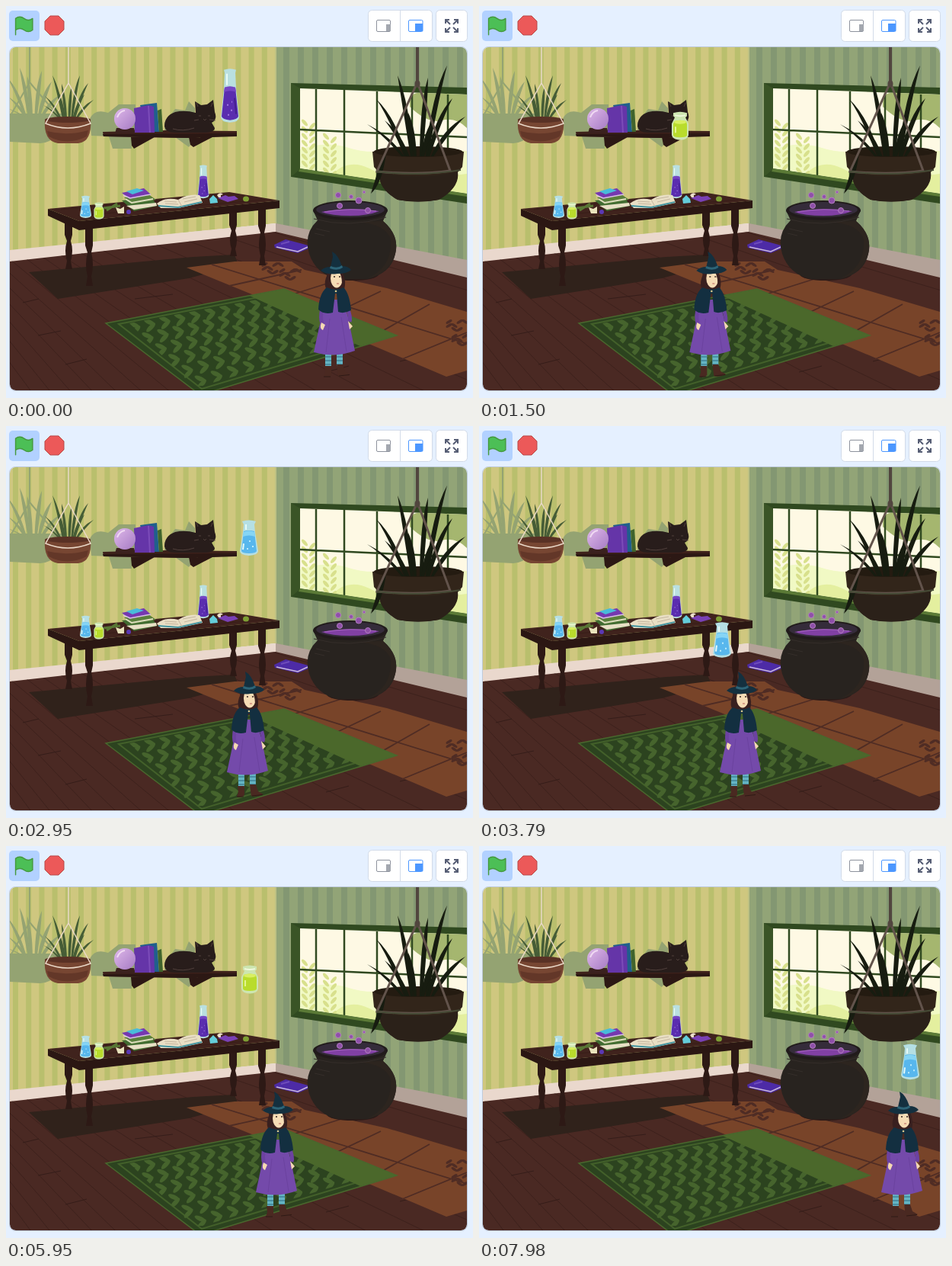
These frames come from a looping animation (613x514 px, 8000 ms). An HTML page:

```html
<!DOCTYPE html>
<html lang="en">
<head>
<meta charset="utf-8">
<title>Potion catcher</title>
<style>
html, body { margin: 0; width: 100%; height: 100%; overflow: hidden; background: #e5f0ff; }
svg { display: block; width: 613px; height: 514px; }
</style>
</head>
<body>
<svg viewBox="0 0 613 514">
<defs>
  <clipPath id="stage"><rect x="5" y="54" width="600" height="450" rx="8"/></clipPath>
  <clipPath id="leftWall"><path d="M5 54H354V285L5 321Z"/></clipPath>
  <clipPath id="rightWall"><path d="M354 54H605V336L354 286Z"/></clipPath>
  <clipPath id="floor"><path d="M5 335L354 296 605 356V504H5Z"/></clipPath>
  <clipPath id="rugInner"><path d="M162 416L362 379 486 430 258 498 245 498Z"/></clipPath>
  <clipPath id="glass"><path d="M386 108L605 116V246L386 213Z"/></clipPath>
  <linearGradient id="orbFill" x2="1" y2="1"><stop stop-color="#dfb9e9"/><stop offset="1" stop-color="#a67bc4"/></linearGradient>

  <g id="purple">
    <path d="M-8-34Q0-37 8-34L7-30 8-10 12 28Q12 34 0 35-12 34-12 28L-8-10-7-30Z" fill="#b9dfe0"/>
    <path d="M-7-11H7L11 27Q10 31 0 32-10 31-11 27Z" fill="#5a2daf"/>
    <path d="M-7-11Q0-14 7-11L8-5Q0-8-8-5Z" fill="#7546c4"/>
    <path d="M-4-29V-14" stroke="#e8fbf6" stroke-width="2"/>
    <path d="M6 3L8 24" stroke="#432190" stroke-width="2"/>
    <path d="M-4 12h2M1 19h2M-3 25h2M2 8h1" stroke="#9c78e0" stroke-width="2"/>
  </g>
  <g id="blue">
    <path d="M-9-22Q0-25 9-22L7-18 8-8 12 17Q12 22 0 23-12 22-12 17L-8-8-7-18Z" fill="#b5dfe4"/>
    <path d="M-7-9Q0-11 7-9L10 17Q9 20 0 20-9 20-10 17Z" fill="#58b7ed"/>
    <path d="M-7-8Q0-11 7-8L8-2Q0-5-8-2Z" fill="#86d5f5"/>
    <path d="M-4-18V-11M-7 7L-8 15" stroke="#e6faf8" stroke-width="2"/>
    <path d="M0 4h2M4 11h2M-3 14h2" stroke="#b9ebfc" stroke-width="2"/>
  </g>
  <g id="green">
    <path d="M-9-17Q0-20 9-17V-13L7-11 11-3V12Q10 18 0 18.500-10 18-11 12V-3L-7-11-9-13Z" fill="#cde5b0"/>
    <path d="M-8-6Q0-9 8-6L9-2V12Q9 15 0 15-9 15-9 12V-2Z" fill="#b9dc2c"/>
    <ellipse cy="-5" rx="8" ry="2.500" fill="#d9ef62"/>
    <path d="M-7-14Q0-12 7-14" stroke="#eff8dc" stroke-width="2" fill="none"/>
    <path d="M-6 1V9" stroke="#e2f58e" stroke-width="2"/>
  </g>

  <g id="witchShape">
    <path d="M-8 350Q-15 362-11 371L13 372Q16 360 11 350Z" fill="#39201f"/>
    <path d="M-12 455H-4V474H-12ZM3 455H11V472H3Z" fill="#65b5c3"/>
    <path d="M-12 460h8M-12 465h8M-12 470h8M3 460h8M3 465h8M3 470h8" stroke="#3f8196" stroke-width="1.500"/>
    <path d="M-13 472H-4V484Q-8 488-14 486L-12 480ZM3 470H11L14 479 21 483Q13 487 5 485Z" fill="#4a2921"/>
    <path d="M-14 486H-5M6 485L20 483.500" stroke="#2f1a16"/>
    <path d="M-12 385H11L18 408 27 452Q0 462-27 454L-18 412Z" fill="#744aaa"/>
    <path d="M-16 396Q-19 410-16 416M17 396Q22 408 20 414" fill="none" stroke="#6c42a1" stroke-width="5"/>
    <path d="M-17 415Q-20 423-15 425L-12 418ZM18 413L24 420 20 424Z" fill="#f5d9b3"/>
    <path d="M-6 410L-11 454M9 408L16 453" stroke="#6b429f"/>
    <path d="M-10 369Q2 374 12 369Q20 377 22 399Q12 404 5 401L3 377H1L-2 402Q-14 405-21 398Q-20 377-10 369Z" fill="#132f40"/>
    <circle cx="2" cy="374" r="1.300" fill="#d6c78c"/>
    <ellipse cx="3" cy="357" rx="8" ry="12.500" fill="#f6dcb5"/>
    <path d="M-5 345Q-7 354-5 365L-9 368-10 350ZM4 347Q10 351 10 364L13 366 11 348Z" fill="#39201f"/>
    <path d="M-1 355h2M6 355h2" stroke="#30201d" stroke-width="1.500"/>
    <path d="M3 364h3" stroke="#b8615c"/>
    <path d="M-18 347Q-13 342-5 342L-2 329-3 322Q5 326 10 341Q18 341 22 346Q17 351 4 351-9 353-18 347Z" fill="#14303f"/>
    <path d="M-5 341Q4 345 10 340L11 343Q4 348-6 344Z" fill="#2d6477"/>
  </g>
</defs>

<g id="toolbar">
  <rect x="4" y="6" width="40" height="40" rx="5" fill="#b2d1ff"/>
  <path transform="translate(11.500 13.500) scale(1.450)" d="M.75 16.750V2A6.440 6.440 0 0 1 8.440 2A6.440 6.440 0 0 0 16.130 2V12.400A6.440 6.440 0 0 1 8.440 12.400A6.440 6.440 0 0 0 .75 12.400" fill="#4cbf56" stroke="#45993d" stroke-linejoin="round" stroke-linecap="round"/>
  <path d="M58 13H69L76 20V31L69 38H58L51 31V20Z" fill="#ec5959" stroke="#b84848"/>
  <g fill="#fff" stroke="#d2dbe9"><rect x="475.500" y="5.500" width="84" height="41" rx="5"/><rect x="564.500" y="5.500" width="41" height="41" rx="5"/></g>
  <path d="M517.500 6V46" stroke="#d2dbe9"/>
  <rect x="486.500" y="18.500" width="18" height="15" rx="1.500" fill="none" stroke="#8d929d"/>
  <path d="M499 24H505V33H499Z" fill="#a3a7af"/>
  <rect x="528.500" y="18.500" width="18.500" height="15" rx="1.500" fill="#fff" stroke="#4c97ff"/>
  <path d="M537 23H547V33H537Z" fill="#4c97ff"/>
  <path d="M577 23V18H582M577 18L583 24M588 18H593V23M593 18L587 24M577 29V34H582M577 34L583 28M588 34H593V29M593 34L587 28" fill="none" stroke="#575e75" stroke-width="2"/>
</g>

<g clip-path="url(#stage)">
  <path d="M5 54H354V285L5 321Z" fill="#cfc77f"/>
  <g id="leftStripes" clip-path="url(#leftWall)"></g>
  <path d="M354 54H605V336L354 286Z" fill="#92a477"/>
  <g id="rightStripes" clip-path="url(#rightWall)"></g>
  <path d="M354 54V286" stroke="#bdc083" stroke-width="2"/>
  <path d="M5 320L354 285V297L5 336Z" fill="#ead8cd"/>
  <path d="M354 285L605 333V357L354 297Z" fill="#b3a298"/>
  <path d="M5 335L354 296 605 356V504H5Z" fill="#4a2923"/>
  <g id="planks" clip-path="url(#floor)" stroke="#351d19"></g>
  <path d="M30 349L245 329 300 326 305 340 240 357 68 384Z" fill="#30221b"/>
  <g id="tiles">
    <path d="M237 343L300 335 375 335 392 346 500 370 605 401V478L578 486 330 381Z" fill="#784429"/>
    <path d="M270 339L605 443M293 367L388 346M345 388L440 358M410 413L492 374M468 441L556 391M520 463L605 428" stroke="#4f2c24" stroke-width="1.800"/>
    <g id="floorLeaves" fill="#4f2c24"></g>
  </g>
  <g id="rug">
    <path d="M131 416L365 371 513 432 255 510Z" fill="#2c431f"/>
    <path d="M148 417L362 376 495 431 257 502Z" fill="none" stroke="#43602a" stroke-width="2"/>
    <g id="rugLeaves" clip-path="url(#rugInner)" fill="#46642d"></g>
    <path d="M320 380L365 371 513 432 465 446Z" fill="#4b682b"/>
    <path d="M131 416L365 371 513 432 255 510Z" fill="none" stroke="#49672d" stroke-width="1.500"/>
  </g>

  <g id="window">
    <path d="M374 101L605 107V259L374 224Z" fill="#304920"/>
    <path d="M386 108L605 116V246L386 213Z" fill="#fef9e4"/>
    <g clip-path="url(#glass)">
      <path d="M386 188Q420 176 450 186T520 186L605 190V246L386 213Z" fill="#f1f9c4"/>
      <path d="M530 118Q545 108 605 110V160Q590 145 572 150T530 132Z" fill="#a5b66f"/>
      <path d="M430 219Q450 200 477 213T510 232L605 220V246H430Z" fill="#e4ef9f"/>
      <g id="gardenLeaves" fill="#d8e08c"></g>
    </g>
    <path d="M407 109V217M444 110V222M487 112V229M533 114V236M580 116V244M386 162L605 172" stroke="#304920" stroke-width="2.500"/>
    <path d="M374 101L386 108V214L374 224Z" fill="#3a5426"/>
    <path d="M386 213L605 246V250L384 217Z" fill="#5b7a36"/>
  </g>

  <g id="wallShadows" fill="#94a372">
    <path d="M5 141H73Q73 178 45 180L5 178ZM110 148Q116 134 134 140L148 129H170V166H208V153L222 135 235 137 240 125 248 134V166H165V187H140L135 171 112 170Z"/>
    <path d="M31 54V100L5 145M31 100L70 146" fill="none" stroke="#94a372" stroke-width="2"/>
    <path d="M222 172H250L240 185Z"/>
    <g id="shadowPlant"></g>
  </g>

  <g id="smallPlant">
    <g id="smallLeaves"></g>
    <path d="M51 149Q81 142 111 149Q113 178 95 180H68Q49 177 51 149Z" fill="#774632"/>
    <ellipse cx="81" cy="149" rx="30" ry="4" fill="#593125"/>
    <path d="M54 164Q80 171 108 163L106 171Q80 184 56 171Z" fill="#633728"/>
    <path d="M82 54V103M82 101L52 154Q81 166 111 154L82 101" fill="none" stroke="#ead8c8" stroke-width="1.500"/>
  </g>

  <g id="shelf">
    <path d="M127 165L210 163 303 164V170L240 173 128 171Z" fill="#3e211b"/>
    <path d="M127 168L303 167V171L240 173 128 171ZM164 172H195L168 187 165 183ZM240 172H271L246 185 242 182Z" fill="#2c1814"/>
    <path d="M145 160H168L170 167H143Z" fill="#3a211e"/>
    <path d="M176 130L198 127 201 165H185Z" fill="#205f8c"/>
    <path d="M199 137L204 135 206 165H201Z" fill="#41642d"/>
    <path d="M168 134L187 130 194 132 195 166H169Z" fill="#6535a8"/>
    <path d="M187 131L189 166" stroke="#7c4cb9" stroke-width="2"/>
    <circle cx="156" cy="148" r="14" fill="url(#orbFill)"/>
    <path d="M146 146Q149 138 156 137" fill="none" stroke="#f0daf3" stroke-width="2"/>
    <path d="M208 158Q208 144 222 139 235 136 249 140L248 125 256 130 264 129 272 123 274 139Q278 149 270 153L274 160Q274 166 258 166H224Q210 167 208 158Z" fill="#281d1b"/>
    <path d="M250 127L252 132M271 127L269 132M253 144h3M265 144h3M259 148l2 2 2-2M247 150l6-1M267 149l8 1M219 161Q232 165 247 160" stroke="#5b4a44" fill="none" stroke-width=".8"/>
  </g>

  <g id="table">
    <g id="legs" fill="#2d1915"></g>
    <path d="M55 266L293 244 359 255 96 282Z" fill="#40231d"/>
    <path d="M55 266L96 282 359 255V265L96 294 55 275Z" fill="#2b1713"/>
    <path d="M72 267L287 247M95 275L340 254" stroke="#381d18"/>
    <use href="#blue" transform="translate(104.500 263.500) scale(.63)"/>
    <use href="#green" transform="translate(122 268.500) scale(.6)"/>
    <use href="#purple" transform="translate(259 230.500) scale(.62)"/>
    <path d="M128 265L150 262M132 268L146 259" stroke="#587634" stroke-width="3"/>
    <path d="M144 264l6 2 5-3v9h-8z" fill="#e9e3bc"/>
    <circle cx="161" cy="270" r="3" fill="#5b38b4"/>
    <path d="M152 255L190 250 199 262 168 269Z" fill="#426c32"/><path d="M158 262L197 258 198 262 168 267Z" fill="#e8e0c5"/>
    <path d="M155 251L187 247 197 254 165 260Z" fill="#5a803c"/><path d="M157 253L165 258 193 253" stroke="#dddcbd" stroke-width="2" fill="none"/>
    <path d="M152 245L181 239 190 247 162 253Z" fill="#7538b0"/><path d="M154 248L163 252 190 247" stroke="#d9c3e3" stroke-width="1.500" fill="none"/>
    <path d="M158 243L172 239 181 242 166 247Z" fill="#49bbd9"/>
    <path d="M198 259Q209 250 226 254 239 246 254 248L258 258 226 265 203 265Z" fill="#e9dfc5"/>
    <path d="M200 262L226 264 257 257" stroke="#4395a0" stroke-width="2" fill="none"/>
    <path d="M226 254L231 263M208 256l16 1M209 259l17 1M232 253l17-3M234 257l17-4" stroke="#c4b59e" fill="none"/>
    <path d="M267 253l5-5 5 5 1 5-10 1z" fill="#64cdda"/>
    <path d="M278 252l10-4 4 2 8-1 5 4-14 4z" fill="#7940b5"/>
    <path d="M277 248q4-5 8-1l-3 1v3h-3z" fill="#eadfca"/>
    <ellipse cx="315" cy="253" rx="4" ry="3.500" fill="#7d9f34"/>
  </g>

  <path d="M352 313L367 306 397 314V318L383 324 353 317Z" fill="#4d2ba6"/>
  <path d="M355 316L383 322 396 316" stroke="#c9b9dd" stroke-width="1.500" fill="none"/>
  <path d="M361 312L372 309" stroke="#6f4cbb" stroke-width="2"/>

  <g id="cauldron">
    <ellipse cx="455" cy="352" rx="34" ry="8" fill="#2b1b18"/>
    <path d="M403 268L409 281Q390 299 398 325 407 352 436 358H475Q506 350 511 325 517 301 495 282L501 268Z" fill="#28231f"/>
    <path d="M458 283Q500 285 505 307 507 342 475 357 503 351 511 325 517 301 495 282Z" fill="#2d251f"/>
    <ellipse cx="452" cy="268" rx="49" ry="13" fill="#211b1b"/>
    <ellipse cx="452" cy="267" rx="45" ry="10" fill="#352c3a"/>
    <path d="M414 270Q452 263 490 269 475 275 452 275 427 275 414 270Z" fill="#8140a4"/>
    <path d="M418 270Q452 264 486 269" stroke="#a765c2" fill="none"/>
    <path d="M404 279Q450 292 499 277M407 292l18 4M405 298l13 3" stroke="#352e2a" fill="none"/>
    <g fill="#8f4fa9" stroke="#b27dc0"><circle cx="436" cy="248" r="3.500"/><circle cx="438" cy="262" r="3.500"/><circle cx="453" cy="250" r="2.500"/><circle cx="463" cy="255" r="4"/><circle cx="475" cy="268" r="3.500"/><circle cx="470" cy="244" r="1.500"/></g>
  </g>

  <g id="bigPlant">
    <path d="M481 191Q541 178 601 191L599 211 593 218Q596 238 568 254 541 259 514 254 488 239 490 218L483 211Z" fill="#32251a"/>
    <ellipse cx="541" cy="191" rx="58" ry="7" fill="#241b11"/>
    <path d="M490 218Q541 229 593 217 594 240 568 254 541 259 514 254 488 240 490 218Z" fill="#2b2119"/>
    <g id="bigLeaves"></g>
    <path d="M540 54V103" stroke="#51453e" stroke-width="4"/>
    <path d="M540 100L487 217Q541 222 583 216L540 100" fill="none" stroke="#62534b" stroke-width="3"/>
    <path d="M487 217Q541 224 597 215" fill="none" stroke="#464b36" stroke-width="2"/>
    <ellipse cx="540" cy="102" rx="3.500" ry="5" fill="#51453e"/>
  </g>

  <use id="witch" href="#witchShape"/>
  <use id="potion" href="#purple"/>
</g>
<rect x="4.500" y="53.500" width="601" height="451" rx="8" fill="none" stroke="#bfcbdc"/>

</svg>

<script>
const $ = id => document.getElementById(id);
const fillGroup = (id, items) => { $(id).innerHTML = items.join(''); };
const range = (n, make) => Array.from({ length: n }, (_, i) => make(i));

const stripe = (x, width, color) =>
  `<rect x="${x}" y="54" width="${width}" height="300" fill="${color}"/>`;
const oval = (x, y, rx, ry, angle) =>
  `<ellipse rx="${rx}" ry="${ry}" transform="translate(${x} ${y}) rotate(${angle})"/>`;

// A pointed leaf that rises first and then arches out to its tip.
function blade(x, y, tipX, tipY, width, color) {
  const bendX = x + (tipX - x) * .45, bendY = y + (tipY - y) * .7;
  return `<path fill="${color}" d="M${x - width / 4} ${y}Q${bendX - width} ${bendY} ${tipX} ${tipY}` +
    `Q${bendX + width} ${bendY + width / 2} ${x + width / 2} ${y}Z"/>`;
}
// Roots are spread along the soil towards the side each leaf leans to.
const plant = (id, x, y, width, color, tips) =>
  fillGroup(id, tips.map(([tx, ty]) => blade(x + (tx - x) * .3, y, tx, ty, width, color)));

fillGroup('leftStripes', range(21, i => stripe(9 + i * 17.2, 7, '#b9bf6d')));
fillGroup('rightStripes', range(14, i => stripe(364 + i * 19, 8, '#839772')));

// Floorboards share one vanishing point beyond the left edge.
fillGroup('planks', range(26, i => {
  const angle = .21 + i * .04;
  return `<path opacity=".6" d="M-258 115L${-258 + 1000 * Math.cos(angle)} ${115 + 1000 * Math.sin(angle)}"/>`;
}).concat('<path d="M42 432l30-6M169 384l50-6M78 470l28-7M22 389l21-5M517 466l40-10M420 480l30-8"/>'));

fillGroup('floorLeaves', [[350, 344], [373, 352], [592, 419], [599, 438]].flatMap(([x, y]) =>
  range(7, i => oval(x + (i % 4 - 1.5) * 7, y + (i % 3 - 1) * 5, 4.5, 1.8, i % 2 ? 32 : -30))));

fillGroup('rugLeaves', range(6, row => range(11, col => {
  const u = (col + .5) / 11, v = (row + .5) / 6;
  const x = 153 + 215 * u + (103 + 18 * u) * v;
  const y = 416 - 39 * u + (86 - 32 * u) * v;
  return oval(x - 3, y - 3, 8, 3, 24) + oval(x - 1, y + 4, 8, 3, -46);
}).join('')));

fillGroup('gardenLeaves', [[397, 153], [425, 171]].flatMap(([x, y]) =>
  range(14, i => oval(x + (i % 2 ? 5 : -5), y + i * 4.5, 5.5, 2.3, i % 2 ? -48 : 48))));

fillGroup('legs', [[82, 279, 345], [109, 289, 367], [298, 268, 328], [336, 264, 340]].map(([x, top, bottom]) => {
  const h = bottom - top;
  return `<path d="M${x - 5} ${top}h10v${h * .32}l-2 ${h * .12}q4 ${h * .2} 0 ${h * .4}l2 ${h * .16}h-9l2-${h * .16}q-4-${h * .2} 0-${h * .4}l-3-${h * .12}z"/>`;
}));

plant('shadowPlant', 35, 146, 4, '#94a372',
  [[2, 94], [18, 81], [3, 119], [47, 85], [60, 99], [72, 116], [28, 92], [1, 134]]);
plant('smallLeaves', 81, 149, 3, '#465d36',
  [[51, 118], [61, 91], [73, 102], [97, 91], [108, 101], [115, 123], [86, 106], [49, 130], [103, 116], [67, 109]]);
plant('bigLeaves', 540, 197, 5, '#171c10',
  [[514, 91], [486, 122], [554, 94], [579, 78], [474, 155], [603, 145], [586, 121], [497, 150], [528, 140], [562, 148]]);
$('bigLeaves').innerHTML += blade(496, 196, 479, 246, 5, '#171c10');

const FRAME = 60, LOOP = 8000, FALL = .159;
const steps = [
  [0, 431], [240, 431], [780, 305], [1500, 305], [1685, 243], [2600, 243],
  [3300, 393], [3430, 393], [3730, 343], [4225, 343], [4345, 330], [4840, 431],
  [5400, 431], [5860, 355], [5950, 355], [6190, 330], [7120, 330], [7565, 492], [7900, 555], [8000, 555]
];
const drops = [
  ['purple', 294, -100], ['green', 264, 1152], ['blue', 319, 2655],
  ['purple', 412, 4134], ['green', 320, 5480], ['blue', 566, 6838]
];

function witchX(t) {
  const next = steps.findIndex(([time]) => time > t);
  const [t0, x0] = steps[next - 1], [t1, x1] = steps[next];
  return x0 + (x1 - x0) * (t - t0) / (t1 - t0);
}

function draw(t) {
  $('witch').setAttribute('transform', `translate(${witchX(t)} 0)`);
  const index = drops.findLastIndex(drop => drop[2] <= t);
  const [kind, x, start] = drops[index];
  const caught = index + 1 < drops.length && t > drops[index + 1][2] - 120;
  const potion = $('potion');
  potion.setAttribute('href', '#' + kind);
  potion.setAttribute('transform', `translate(${x} ${101 + FALL * (t - start)})`);
  potion.setAttribute('visibility', caught ? 'hidden' : 'visible');
}

const begin = performance.now();
function tick(now) {
  const elapsed = Math.max(0, now - begin) % LOOP;
  draw(Math.floor(elapsed / FRAME) * FRAME + 5);
  requestAnimationFrame(tick);
}
draw(0);
requestAnimationFrame(tick);
</script>
</body>
</html>
```
